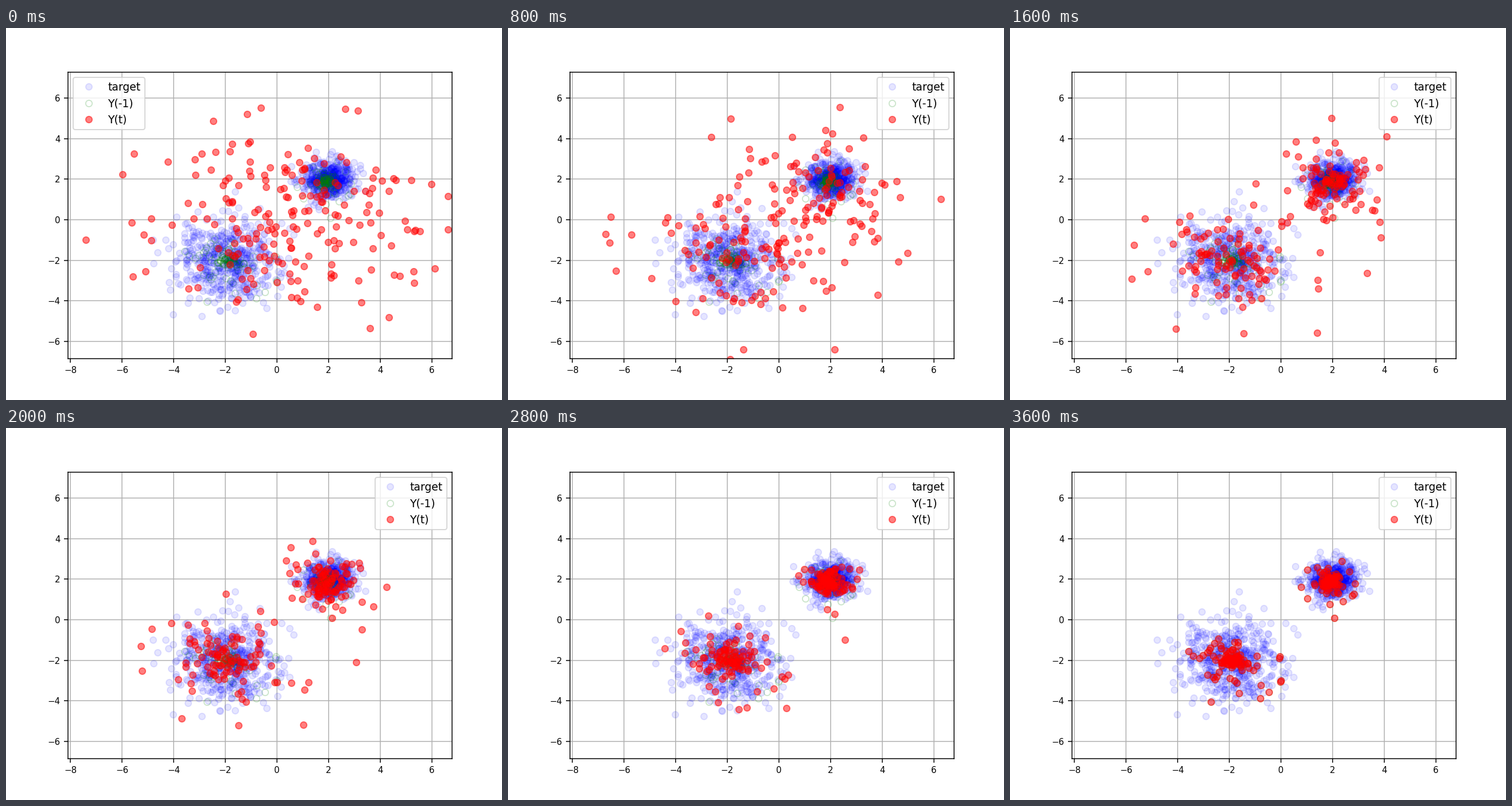
A matplotlib script for the animation above (3.8 s loop, 864 by 648 pixels).

```python
import numpy as np
import matplotlib.pyplot as plt
from matplotlib.animation import FuncAnimation

FRAMES, STEP = 19, 200
LAST = FRAMES - 1
rng = np.random.default_rng(11)

# Far strays: start and end of a straight path, in axis units
STRAYS = np.array([
    [[-7.4, -1.0], [-3.57, -1.55]],
    [[4.34, -4.8], [2.06, 0.09]],
    [[2.9, -7.2], [-0.46, -3.56]],
    [[-1.3, -7.2], [-1.63, -3.62]],
    [[6.12, -2.4], [1.03, 1.05]]])


def limit(z, reach):
    """Pull points further out than reach back onto that radius."""
    r = np.hypot(z[..., 0], z[..., 1])[..., None]
    return z * np.minimum(1, reach / r)


def cloud(n, centre, sd):
    return np.asarray(centre) + sd * limit(rng.normal(size=(n, 2)), 3.4)


def gather(n, centre, wide, tight, power):
    """Shrink a wide cloud at the origin onto its centre: (frame, particle, xy)."""
    rho = 0.93
    z = rng.normal(size=(n, 2))
    path = []
    for k in range(LAST, -1, -1):
        u = k / LAST
        pull = 1 - 0.9 * max(0, 1 - k / 8) ** 2
        sd = tight + (wide - tight) * (1 - u) ** power
        far = limit(z, 2.6)
        # the cloud grows longer tails as it settles
        r2 = (far ** 2).sum(axis=1, keepdims=True)
        tail = 1 + u * (0.18 * r2 - 0.25)
        path.append(pull * np.asarray(centre) + sd * tail * far)
        z = rho * z + np.sqrt(1 - rho ** 2) * rng.normal(size=z.shape)
    return np.array(path[::-1])


target = np.vstack([cloud(500, (-2, -2), 1), cloud(500, (2, 2), 0.47)])

ramp = np.linspace(0, 1, FRAMES)[:, None, None]
strays = STRAYS[:, 0] * (1 - ramp) + STRAYS[:, 1] * ramp
walk = np.concatenate([
    gather(97, (-1.93, -2.05), 2.5, 0.42, 2),
    gather(98, (1.86, 1.88), 2.5, 0.22, 2.2),
    strays], axis=1)

fig, ax = plt.subplots(figsize=(6.4, 4.8), dpi=135)
fig.subplots_adjust(left=0.125, bottom=0.111, right=0.8995, top=0.881)
ax.plot(*target.T, "o", color="b", alpha=0.1, label="target")
ax.plot(*walk[-1].T, "o", color="g", mfc="none", alpha=0.2, label="Y(-1)")
dots, = ax.plot(*walk[0].T, "o", color="r", alpha=0.5, label="Y(t)")
ax.set_xlim(-8.089, 6.782)
ax.set_ylim(-6.854, 7.274)
ax.set_xticks(range(-8, 7, 2))
ax.set_yticks(range(-6, 7, 2))
ax.tick_params(labelsize=8)
ax.grid(True)
legend = ax.legend(loc="upper left")


def update(k):
    dots.set_data(*walk[k].T)
    legend.set_loc("upper left" if k < 3 else "upper right")
    return dots, legend


anim = FuncAnimation(fig, update, frames=FRAMES, interval=STEP, repeat=True)
plt.show()
```
